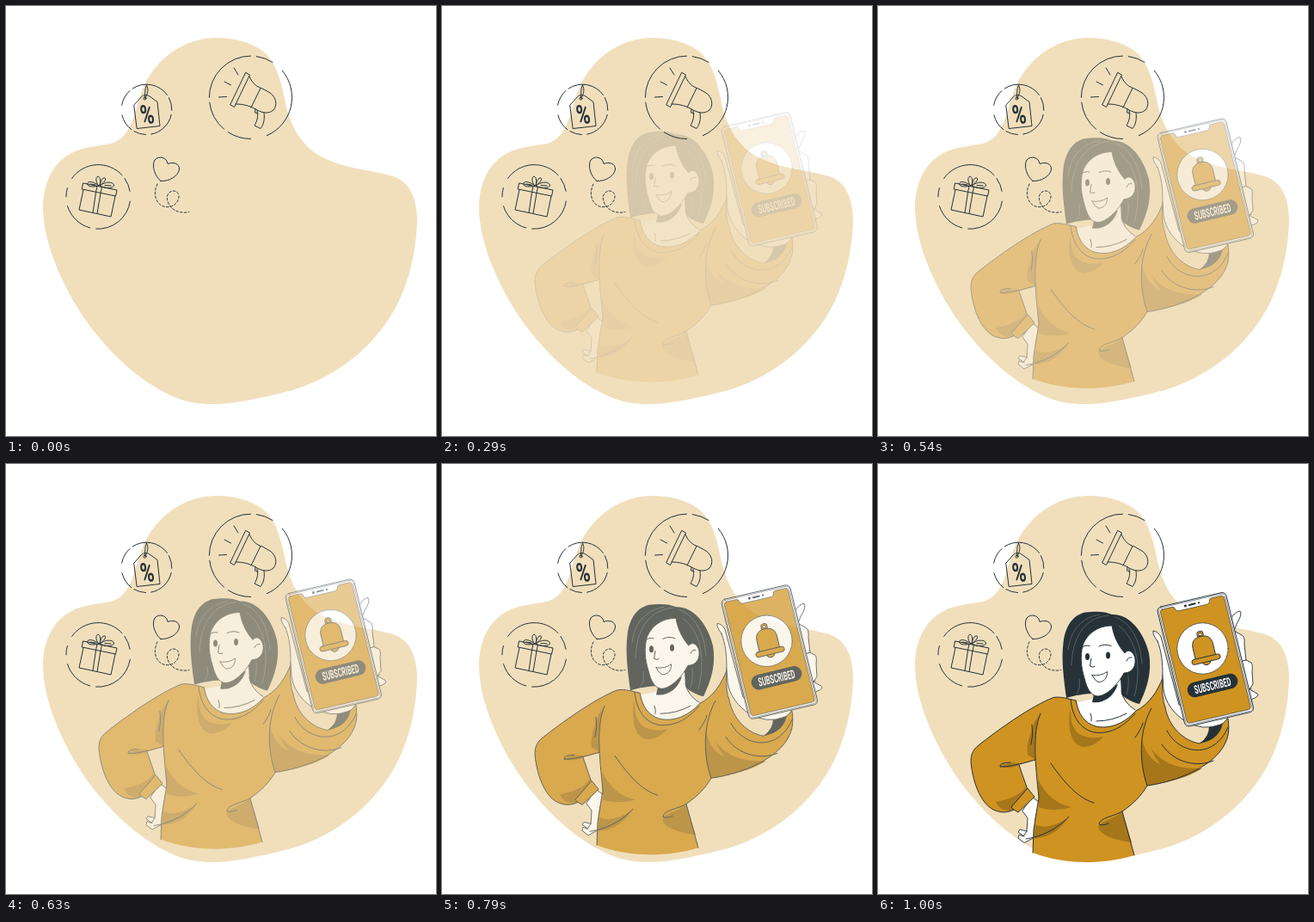
Write an HTML page that moves like this. It is 500 px wide and 500 px high and loops after 1040 ms.

```html
<!DOCTYPE html>
<html lang="en">
<head>
<meta charset="utf-8">
<title>Subscribed</title>
<style>
  html, body { margin: 0; width: 100%; height: 100%; overflow: hidden; background: #fff; }
  svg { display: block; width: 100vw; height: 100vh; }
  .line { fill: none; stroke: #263238; stroke-width: 1; stroke-linecap: round; stroke-linejoin: round; }
  .shape { stroke: #263238; stroke-width: .9; stroke-linejoin: round; stroke-linecap: round; }
  .white { fill: #fff; }
  .gold { fill: #cf9321; }
  .shade { fill: #a6761a; }
  .sand { fill: #f1dfbc; }
  .dark { fill: #263238; }
  .strand { fill: none; stroke: #75807f; stroke-width: .6; stroke-linecap: round; }
  text { font-family: Roboto, "Liberation Sans", sans-serif; font-weight: 700; text-anchor: middle; }
  #person { opacity: 0; }
</style>
</head>
<body>
<svg viewBox="0 0 500 500">
  <path class="sand" d="M245 37C208 37 176 60 161 92C148 120 149 152 122 160C108 163 92 163 76 171
    C55 182 43 205 43 236C44 272 60 312 82 349C108 392 148 431 184 449C200 458 219 463 238 463
    C268 463 300 455 332 447C390 430 438 388 460 336C472 308 478 275 478 246C477 222 469 202 446 197
    C420 190 395 189 370 177C345 165 331 141 325 113C320 88 315 66 298 52C284 42 265 37 245 37Z"/>

  <g class="line">
    <path id="rings"/>
    <!-- megaphone -->
    <path d="M279 77.500L283.500 80L265.500 117.500L261 115ZM283 82C287 91 292 94 298 96L307 101
      C314 106 316 115 311 121C305 126 298 124 292 121C284 116 276 114 267 114M296 95.500L285 118
      M292 122C294 130 291 135 289 139L296 142.500C300 137 301 131 300 124M290 120L289.500 124L293 125
      M265 72L270 80M254 88L261.500 92M247.500 106L256.500 105.500"/>
    <!-- price tag -->
    <path d="M149 115L157.500 105.500C160 103 164 103 167 105L176 111.500L179 139.500L152.500 142.500Z
      M161.500 107C162 102 161 96 163.500 92M162 107C165 102 166 97 163.500 92"/>
    <circle cx="161.500" cy="107.500" r="1.600"/>
    <!-- gift -->
    <path d="M90 206L129 214L127.500 221L88.500 213ZM90 213.500L85 237L122 245L127 221
      M106 209.500L104.500 216.500L101 240.500M111.500 210.500L110 217.500L106 241.500
      M108 209C101 211 95 210 94.500 207C95 203 102 204 108 209C104 205 104 199 107 198C110 199 110 204 109 209
      C110 204 112 199 115 200C117 202 113 206 109 209C115 204 124 204 125.500 208C126 212 116 213 109 209
      M98 207L104 208M115 208.500L122 209"/>
    <!-- heart and its trail -->
    <path d="M180 203.500C173 198 169 186 173 179C178 173.500 187 176 188 183.500C194 181 202 183 201.500 190
      C200 198 190 204 180 203.500Z"/>
    <path stroke-dasharray="2.600 2.200" d="M176 207C171 217 173 229 183 233C193 236 201 229 201 221
      C200 213 190 213 187.500 221C186 231 196 243 213 239.500"/>
  </g>
  <text class="dark" font-size="31" transform="translate(164 126) rotate(-6) scale(.72 1)" y="11">%</text>

  <g id="person">
    <!-- hair -->
    <path class="dark" d="M219 272C216 250 213 228 215.500 208C218 185 230 172 247 172C257 171 266 172 272 175
      C292 174 309 195 315 220C319 243 312 263 304 279C296 277 288 273 282 267L282 245L244 245L253 267
      C240 267 229 269 219 272Z"/>
    <path class="strand" d="M268 176C243 178 226 198 225 234M258 175C238 178 224 192 221 216M234 250Q236 262 231 267
      M276 178C293 184 305 204 307 232M280 188C293 198 302 215 302 240Q302 258 298 270M291 246Q292 260 289 268"/>
    <!-- neck and face -->
    <path class="white" d="M232 277L251 273L252 262L282 250L283 267C286 275 292 280 301 287C288 302 272 308 256 306
      C241 303 233 292 232 277Z"/>
    <path class="dark" d="M249 277C262 279 274 271 279 256L256 266L251 268Z"/>
    <path class="line" d="M283 264Q285 277 299 286M247 290Q249 294 248 299M254 299Q272 299 289 290"/>
    <path class="shape white" d="M272 188C258 188 244 195 238 211C235 224 236 236 240 249C243 261 247 269 255 270
      C265 270 278 258 286 243C294 243 300 237 299 227C298 219 291 214 287 220C280 212 274 201 272 188Z"/>
    <path class="line" d="M236 214Q240 210 246 211.500M257 212Q264 208.500 271 211.500M248 226L246.500 235Q249 237 252 235.500
      M289 229Q291 224 295 225"/>
    <ellipse class="dark" cx="243.500" cy="224" rx="2.500" ry="4"/>
    <ellipse class="dark" cx="267.500" cy="222.500" rx="2.500" ry="4"/>
    <path class="shape white" d="M249 245.500Q259 247 266.500 241.500C267 249 262 254 256 253.500Q252 252 249 245.500Z"/>

    <!-- hand on hip -->
    <path class="shape white" d="M168 403L179 387L187 393C186 403 183 408 183 415L182 434L170 440.500L163 435L164 431
      L169 433L173 427L174 412ZM173 427L165 425L163 428L170 433M182 434L172 436"/>

    <!-- sweater -->
    <path class="gold" d="M230 275C221 273 212 270 204 271.500C177 282 137 311 117 327C109 333 107 341 108.500 351
      C111 371 120 398 138 403.500Q148 407 158 402L163 405L182 387L174 377L173 376L164 350L183 344L187 388L181 425
      L180 452C211 464 254 468 298 455L284 404C297 395 306 386 313 374C350 369 393 350 404 324
      C409 314 408 304 407 296L360 300L340 284L331 249C324 265 315 279 300 287C284 304 268 308 253 305
      C240 301 233 291 230 275Z"/>
    <g class="shade">
      <path d="M224 284C220 300 222 326 238 329C248 329 256 324 262 317C248 320 232 318 227 305C224 297 224 290 224 284Z"/>
      <path d="M189 290C181 308 182 330 183 344L174 338C172 325 178 312 182 300Z"/>
      <path d="M186 366C195 386 210 396 225 399C212 403 196 403 187 399Z"/>
      <path d="M183 419C192 425 207 420 221 412C208 430 195 435 181 435Z"/>
      <path d="M284 404C276 412 266 413 258 419C252 425 264 436 295 440Z"/>
      <path d="M172 375C165 386 150 390 137 393C141 401 148 405 158 402L155 399L174 377Z"/>
      <path d="M164 348Q152 346 142 351Q149 356 164 350Z"/>
      <path d="M307 318C304 340 308 360 313 374C340 370 361 364 377 354C352 355 332 350 318 331C322 341 325 346 330 350
        C318 345 309 334 307 318Z"/>
    </g>
    <path class="line" stroke-width=".9" d="M230 275C221 273 212 270 204 271.500C177 282 137 311 117 327C109 333 107 341 108.500 351
      C111 371 120 398 138 403.500Q148 407 158 402L163 405L182 387L174 377L155 399L158 402M173 376L164 350
      M183 344Q152 353 142 352Q141 347 154 347M189 290C179 314 183 348 187 388L181 425L180 452
      M179 303Q181 315 178 326M298 455L284 404C297 395 306 386 313 374C350 369 393 350 404 324C409 314 408 304 407 296
      M300 287C316 279 325 264 331 249M230 275C233 291 240 301 253 305C268 308 284 304 300 287
      M224 274C226 294 235 308 251 312C272 315 288 303 299 290M201 348C217 371 232 388 251 394
      M182 434Q205 428 222 410M284 404C274 410 258 411 257 419Q260 421 268 418M308 301Q307 307 299 318
      M318 284C305 307 302 342 313 374M330 326C344 348 372 353 390 345M336 310C350 338 391 344 407 306"/>

    <!-- raised hand -->
    <path class="shape sand" d="M331 246L350 290L401 299L387 308C384 317 379 322 374 325C355 322 338 305 334 283
      C329 270 331 255 331 246Z"/>
    <path class="dark" d="M374 325C390 322 400 313 401 299L385 305Q385 317 374 325Z"/>
    <path class="shape white" d="M325 206Q319 198 320 194Q326 195 329 201L350 280L410 288C407 296 403 301 398 303
      Q378 311 357 299C345 291 334 278 332 262L331 246C331 232 330 218 325 206Z"/>
    <path class="shape white" d="M410 180Q416 171 421 171Q424 175 417 186L414 194L423 199Q427 201 426 210L428 228
      L434 231Q436 233 435 241L436 256L432 262L441 267Q444 270 436 273L430 275L422 260Z"/>
    <path class="line" d="M424 229L428 228M428 262L434 261"/>

    <!-- phone -->
    <g transform="matrix(.975 -.225 .235 .972 324 167)">
      <rect class="shape white" width="82" height="143" rx="5"/>
      <rect class="line" x="1.400" y="1.400" width="79.200" height="140.200" rx="4" style="stroke-width:.5"/>
      <path class="shape gold" d="M6 3.500H18Q20 3.500 20.500 6Q21 9.500 25 9.500H57Q61 9.500 61.500 6Q62 3.500 64 3.500H76
        Q79 3.500 79 7V136Q79 139.500 76 139.500H6Q3 139.500 3 136V7Q3 3.500 6 3.500Z" style="stroke-width:.6"/>
      <circle class="dark" cx="33" cy="5.500" r="1.500"/>
      <rect class="dark" x="36.500" y="4.500" width="9" height="2" rx="1"/>
      <circle class="dark" cx="49" cy="5.500" r="1.100"/>
    </g>
    <circle class="shape white" cx="377.500" cy="214.500" r="29.700" style="stroke-width:.7"/>
    <g class="shape gold" transform="translate(378.500 214.500) rotate(-13.500)">
      <circle cx="0" cy="-17" r="2.700" fill="none" stroke-width="2.800"/>
      <circle cx="0" cy="-17" r="2.700" fill="none" style="stroke:#cf9321;stroke-width:1.300"/>
      <path d="M-5 15A5 4.500 0 0 0 5 15Z"/>
      <path d="M-12 11V-3C-12 -11 -7 -14.500 0 -14.500S12 -11 12 -3V11Z"/>
      <rect x="-17" y="10" width="34" height="6" rx="3"/>
    </g>
    <g transform="translate(389 257.500) rotate(-13.500)">
      <rect class="dark" x="-30" y="-8.700" width="60" height="17.400" rx="8.700"/>
      <text fill="#fff" font-size="14" transform="scale(.52 1)" y="5">SUBSCRIBED</text>
    </g>
  </g>
</svg>
<script>
  const LOOP = 1040, SLIDE = 1000, STEP = SLIDE / 24;

  // Broken circles: centre, radius, then start and end angles of each arc
  const rings = [
    [284.5, 106.3, 48.2, [180, 270, 278, 302, 320, 427, 90, 123, 130, 173]],
    [163.5, 120.3, 29.3, [190, 228, 236, 325, 332, 362, 12, 80, 92, 120, 127, 167]],
    [107.3, 221.8, 37.4, [8, 94, 105, 163, 180, 196, 215, 318, 325, 350]],
  ];

  function arc(cx, cy, r, from, to) {
    const at = deg => {
      const a = deg * Math.PI / 180;
      return `${(cx + r * Math.cos(a)).toFixed(2)} ${(cy + r * Math.sin(a)).toFixed(2)}`;
    };
    return `M${at(from)}A${r} ${r} 0 0 1 ${at(to)}`;
  }

  let d = '';
  for (const [cx, cy, r, ends] of rings)
    for (let i = 0; i < ends.length; i += 2) d += arc(cx, cy, r, ends[i], ends[i + 1]);
  document.getElementById('rings').setAttribute('d', d);

  const slide = document.getElementById('person').animate(
    [{ opacity: 0, transform: 'translateY(-30px)' }, { opacity: 1, transform: 'translateY(0px)' }],
    { duration: SLIDE, easing: 'ease-in', fill: 'both' });
  slide.pause();

  // 24 steps a second, each showing the slide at the middle of its step
  function draw(now) {
    const step = Math.floor((now % LOOP + 5) / STEP);
    slide.currentTime = step ? Math.min((step + .5) * STEP, SLIDE) : 0;
  }

  const start = performance.now();
  function tick() {
    draw(performance.now() - start);
    requestAnimationFrame(tick);
  }
  tick();
</script>
</body>
</html>
```
